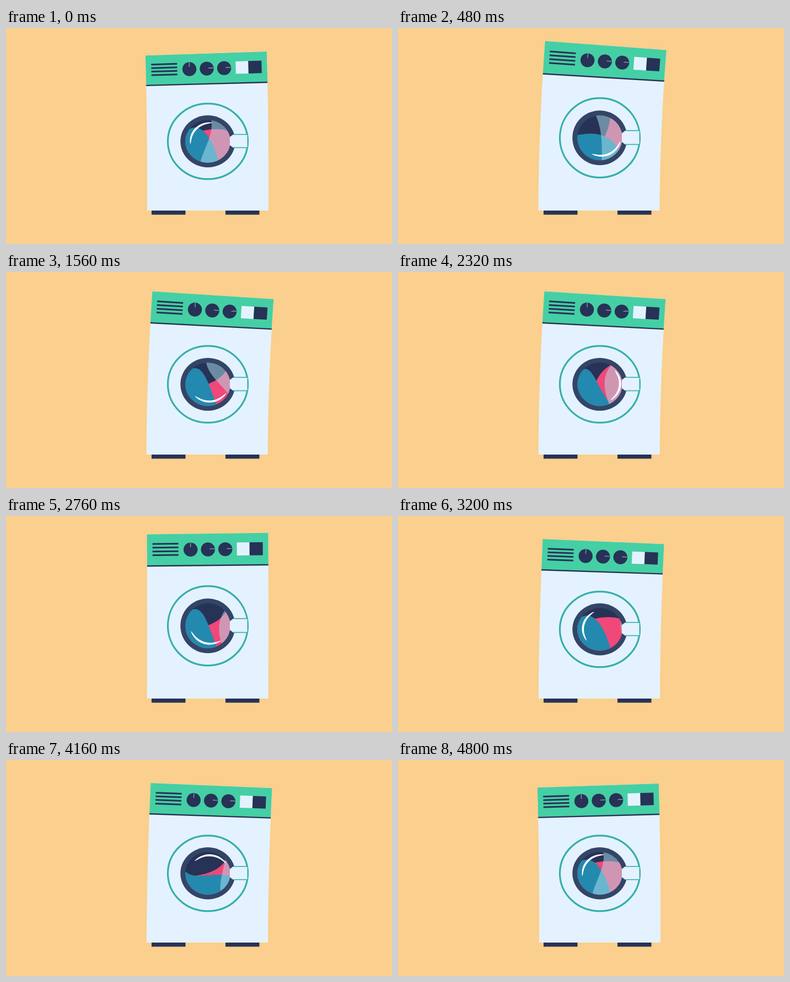
Write an HTML page with a canvas that moves like this. It is 700 by 394 pixels and loops after 4.96 s.

```html
<!DOCTYPE html>
<html lang="en">
<head>
<meta charset="utf-8">
<title>Washing machine</title>
<style>
  html, body { margin: 0; width: 100%; height: 100%; overflow: hidden; background: #fbcf8d; }
  canvas { display: block; }
</style>
</head>
<body>
<canvas id="stage" width="700" height="394"></canvas>
<script>
const ctx = document.getElementById('stage').getContext('2d');
const LOOP = 4960, STEP = 40, HOLD = 160, STEPS = 120;
const TAU = Math.PI * 2;
const FLOOR = 333, HEIGHT = 286.5, HALF = 110;
const color = {
  wall: '#fbcf8d', body: '#e4f2ff', panel: '#45cfa4', navy: '#263256',
  rim: '#334567', line: '#35b0a8', teal: '#2489ae', pink: '#f04878',
  veil: 'rgba(176,228,240,0.5)', tick: '#8d96b0'
};

// Cosine that tops out at the step `peak` and repeats every `period` steps.
const wave = (step, period, peak) => Math.cos(TAU * (step - peak) / period);

function polygon(points, fill) {
  ctx.beginPath();
  points.forEach(p => ctx.lineTo(p[0], p[1]));
  ctx.closePath();
  ctx.fillStyle = fill;
  ctx.fill();
}

function segment(a, b, stroke, width) {
  ctx.beginPath();
  ctx.moveTo(...a);
  ctx.lineTo(...b);
  ctx.strokeStyle = stroke;
  ctx.lineWidth = width;
  ctx.stroke();
}

function oval(rx, ry) {
  ctx.beginPath();
  ctx.ellipse(0, 0, rx, ry, 0, 0, TAU);
}

// Maps a point of the upright cabinet to the bent, stretched one.
function makeBend(lean, stretch) {
  return (x, h) => {
    const u = h / HEIGHT;
    return [
      365.5 + x + lean * (u * u - 0.1) + 1.6 * u,
      FLOOR - h * stretch + x * 2 * lean * u / HEIGHT
    ];
  };
}

function drawCabinet(bend) {
  const block = (left, right, low, high, fill) => {
    const sideA = [], sideB = [];
    for (let i = 0; i <= 16; i++) {
      const h = low + (high - low) * i / 16;
      sideA.push(bend(left, h));
      sideB.unshift(bend(right, h));
    }
    polygon(sideA.concat(sideB), fill);
  };
  block(-HALF, HALF, 0, HEIGHT, color.body);
  block(-HALF, HALF, 231, HEIGHT, color.panel);
  block(-HALF, HALF, 230, 232.4, color.navy);

  for (let i = 0; i < 4; i++) {
    const h = 269.5 - 6.5 * i;
    segment(bend(-100, h), bend(-53, h), color.navy, 3);
  }
  for (let i = 0; i < 3; i++) {
    const x = -31 + 31.5 * i, h = 259;
    ctx.beginPath();
    ctx.arc(...bend(x, h), 12.7, 0, TAU);
    ctx.fillStyle = color.navy;
    ctx.fill();
    if (i) segment(bend(x + 3, h + 1), bend(x + 12, h + 1), color.tick, 1.4);
    else segment(bend(x, h + 4), bend(x, h + 12), color.tick, 1.4);
  }
  block(53, 76, 248, 270.5, color.body);
  block(76, 100, 248, 270.5, color.navy);
}

// Fills everything below a wavy edge that is tilted (degrees) and sunk by depth;
// crests are the curve's two control points, measured from the edge.
function cloth(tilt, depth, crestA, crestB, fill) {
  ctx.save();
  ctx.rotate(tilt * TAU / 360);
  ctx.translate(0, depth);
  ctx.beginPath();
  ctx.moveTo(-41, 0);
  ctx.bezierCurveTo(...crestA, ...crestB, 41, 0);
  [[90, 0], [90, 90], [-90, 90], [-90, 0]].forEach(p => ctx.lineTo(...p));
  ctx.closePath();
  ctx.fillStyle = fill;
  ctx.fill();
  ctx.restore();
}

function drawLaundry(step) {
  const swing = wave(step, 5, 2.4), ripple = 18 * wave(step, 2.5, 4.1);
  cloth(-37 - 32 * swing, -6 + 9 * swing,
    [-14, 0.4 * ripple], [14, ripple], color.pink);

  const slosh = wave(step, 10, 8.8);
  cloth(28 + 22 * slosh, 6.5 + 7 * wave(step, 10, 0),
    [-30 - 11 * slosh, -10 - 26 * wave(step, 10, 9.3)],
    [5, -8 - 22 * wave(step, 10, 1.3)], color.teal);

  const half = wave(step, STEPS / 2, 0);
  cloth(-98 + 15 * wave(step, STEPS, 95) + 18 * half,
    23 + 22 * wave(step, STEPS, 77) - 13 * half,
    [-14, -7 + 13 * wave(step, STEPS, 20)],
    [14, -6 + 18 * wave(step, STEPS, 0)], color.veil);
}

function drawShine(angle) {
  const outer = [], inner = [];
  for (let i = 0; i <= 30; i++) {
    const k = i / 15 - 1, a = angle + k * 0.95;
    const thick = 3.8 * Math.sqrt(1 - k * k);
    const at = r => [3 + r * Math.cos(a), -1 + r * 0.95 * Math.sin(a)];
    outer.push(at(35.5));
    inner.unshift(at(35.5 - thick));
  }
  polygon(outer.concat(inner), '#fff');
}

function drawDoor(step, stretch) {
  ctx.save();
  ctx.translate(366, FLOOR - 126.3 * stretch);
  ctx.scale(1, stretch);

  oval(49.7, 47.5);
  ctx.fillStyle = color.rim;
  ctx.fill();

  ctx.save();
  oval(41, 39);
  ctx.clip();
  ctx.fillStyle = color.navy;
  ctx.fillRect(-50, -50, 100, 100);
  drawLaundry(step);
  const degrees = 204 + 108 * step + 20 * wave(step, STEPS / 2, 0);
  drawShine(degrees * TAU / 360);
  ctx.restore();

  oval(72.5, 69);
  ctx.strokeStyle = color.line;
  ctx.lineWidth = 3.2;
  ctx.stroke();

  polygon([[40, -8], [46, -12.5], [71.5, -12.5], [71.5, 11.5], [46, 11.5], [40, 7]], color.body);
  segment([47, -12.5], [72, -12.5], color.line, 1.6);
  segment([47, 11.5], [72, 11.5], color.line, 1.6);
  ctx.restore();
}

function draw(step) {
  const lean = 3 + 7.8 * wave(step, 24, 12.5);
  const stretch = 1.025 + 0.0275 * wave(step, 8, 4.5);
  ctx.fillStyle = color.wall;
  ctx.fillRect(0, 0, 700, 394);
  ctx.fillStyle = color.navy;
  ctx.fillRect(264, 332, 61.5, 8.5);
  ctx.fillRect(398, 332, 61.5, 8.5);
  drawCabinet(makeBend(lean, stretch));
  drawDoor(step, stretch);
}

function tick() {
  const t = performance.now() % LOOP;
  draw(t < HOLD ? 0 : Math.min(STEPS, Math.floor(t / STEP)));
  requestAnimationFrame(tick);
}
tick();
</script>
</body>
</html>
```
